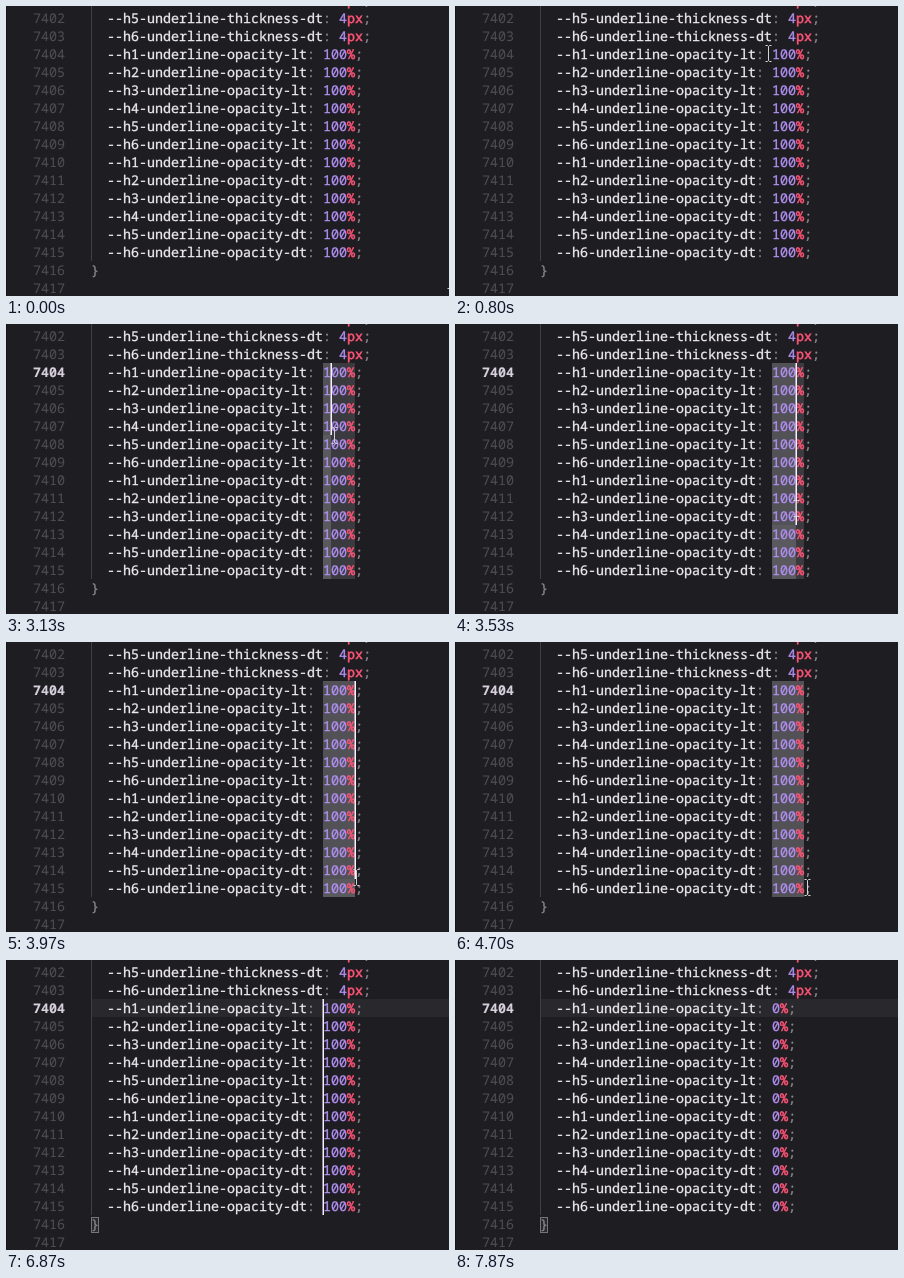
Write an HTML page that moves like this. It is 443 px wide and 290 px high and loops after 8 s.

```html
<!DOCTYPE html>
<html lang="en">
<head>
<meta charset="utf-8">
<title>Column selection</title>
<style>
  html, body { margin: 0; width: 100%; height: 100%; overflow: hidden; background: #1e1d21; }
  svg { display: block; width: 443px; height: 290px; }
  text {
    font: 13.3333px "Noto Sans Mono", "DejaVu Sans Mono", monospace;
    white-space: pre; text-rendering: geometricPrecision;
    fill: currentColor; stroke: currentColor; stroke-width: 0.3px;
  }
  .name { color: #ece8f0; }
  .punct { color: #8b888f; }
  .num { color: #b08ff0; }
  .unit { color: #ff5577; stroke-width: 0.5px; }
  .line { color: #4e4d52; stroke-width: 0.1px; }
  .line.on { color: #d6d0dc; font-weight: 700; }
</style>
</head>
<body>
<svg id="stage" viewBox="0 0 443 290"></svg>
<script>
const LOOP = 8000, CH = 8, ROW = 18, LEFT = 85, COL = 317, TOP = 39, ROWS = 12;
const CLICK = 1330, MATCH = 1500, DRAG = 2830, DROP = 4200, HIDE = 5200;
const HOME = 5870, DELETE_1 = 6930, DELETE_2 = 7330;
const stage = document.getElementById('stage');

function add(tag, attrs, text) {
  const el = document.createElementNS('http://www.w3.org/2000/svg', tag);
  for (const k in attrs) el.setAttribute(k, attrs[k]);
  if (text !== undefined) el.textContent = text;
  return stage.appendChild(el);
}
const box = (x, y, width, height, fill) => add('rect', { x, y, width, height, fill });
const label = (x, y, cls, text) => add('text', { x, y, class: cls }, text);
const show = (el, on) => el.setAttribute('visibility', on ? 'visible' : 'hidden');
const clamp = (v, max) => Math.max(0, Math.min(max, v));
const baseline = n => 17 + (n - 7402) * ROW;
const perRow = make => Array.from({ length: ROWS }, (_, i) => make(i, TOP + i * ROW));

box(0, 0, 443, 290, '#1e1d21');
box(0, 0, 1, 290, '#151418');
const active = box(LEFT, TOP, 358, ROW, '#29282c');
const match = box(COL, TOP, 4 * CH, ROWS * ROW, '#3b3a3f');
const marks = perRow((i, y) => box(COL, y, 0, ROW, '#4b4a4f'));
box(LEFT, 0, 1, 255, '#403f44');
const bracket = add('rect', { x: 85.5, y: 257.5, width: 7, height: 15, fill: '#29282c', stroke: '#77757b' });

const lines = {};
for (let n = 7401; n <= 7417; n++) lines[n] = label(27, baseline(n), 'line', n);

function declare(n, name, num, unit) {
  const y = baseline(n), x = 101 + (name.length + 2) * CH;
  label(101, y, 'name', name);
  label(x - 2 * CH, y, 'punct', ':');
  const parts = [label(x, y, 'num', num), label(0, y, 'unit', unit), label(0, y, 'punct', ';')];
  const setNum = s => {
    parts[0].textContent = s;
    parts[1].setAttribute('x', x + s.length * CH);
    parts[2].setAttribute('x', x + (s + unit).length * CH);
  };
  setNum(num);
  return setNum;
}
for (let h = 4; h <= 6; h++) declare(7397 + h, `--h${h}-underline-thickness-dt`, '4', 'px');
const values = perRow(i =>
  declare(7404 + i, `--h${i % 6 + 1}-underline-opacity-${i < 6 ? 'lt' : 'dt'}`, '100', '%'));
label(LEFT, baseline(7416), 'punct', '}');

const carets = perRow((i, y) => box(COL, y, 1.5, ROW, '#f7f1ff'));
const beam = add('path', {
  d: 'M-3 -8H-1L0 -7L1 -8H3M0 -7V7M-3 8H-1L0 7L1 8H3',
  fill: 'none', stroke: '#d4d3d6'
});

// pointer moves: start, end, target x, target y
const moves = [
  [70, 600, 309, 39],
  [600, 800, 313.5, 48],
  [970, 1070, 319.5, 48],
  [CLICK, 1530, 317.5, 48],
  [DRAG, 4270, 352, 246],
  [5030, HIDE, 384, 250]
];

function pointer(t) {
  let x = 444, y = 291;
  for (const [start, end, tx, ty] of moves) {
    const k = Math.sin(clamp((t - start) / (end - start), 1) * Math.PI / 2);
    x += (tx - x) * k;
    y += (ty - y) * k;
  }
  return [x, y];
}

// the caret blinks every 500 ms, counted from the last input
function caretOn(t) {
  if (t < CLICK) return false;
  if (t >= DRAG && t < DROP) return true;
  const since = t < DRAG ? 1300 : t < HOME ? DROP : t < 7370 ? HOME : 7370;
  return (t - since) % 1000 < 500;
}

function draw(t) {
  const [px, py] = pointer(t);
  const dragged = t >= DRAG && t < HOME;
  const cols = dragged ? clamp(Math.round((px - COL) / CH), 4) : 0;
  const last = t < DRAG ? 0 : clamp(Math.floor((py - TOP - 1) / ROW), ROWS - 1);
  const plain = t >= CLICK && !cols;

  show(active, plain);
  show(bracket, plain);
  show(match, t >= MATCH && t < HOME);
  lines[7404].setAttribute('class', t >= CLICK ? 'line on' : 'line');

  marks.forEach((m, i) => {
    m.setAttribute('width', cols * CH);
    m.setAttribute('fill', i <= last ? '#525156' : '#5a595e');
  });

  const num = t >= DELETE_2 ? '0' : t >= DELETE_1 ? '00' : '100';
  values.forEach(setNum => setNum(num));

  const blink = caretOn(t);
  carets.forEach((c, i) => {
    show(c, blink && i <= last);
    c.setAttribute('x', COL + cols * CH - 0.5);
  });

  show(beam, t < HIDE);
  beam.setAttribute('transform', `translate(${Math.floor(px) + 0.5} ${Math.round(py) - 0.5})`);
}

function tick(now) {
  draw(now % LOOP);
  requestAnimationFrame(tick);
}
draw(0);
requestAnimationFrame(tick);
</script>
</body>
</html>
```
